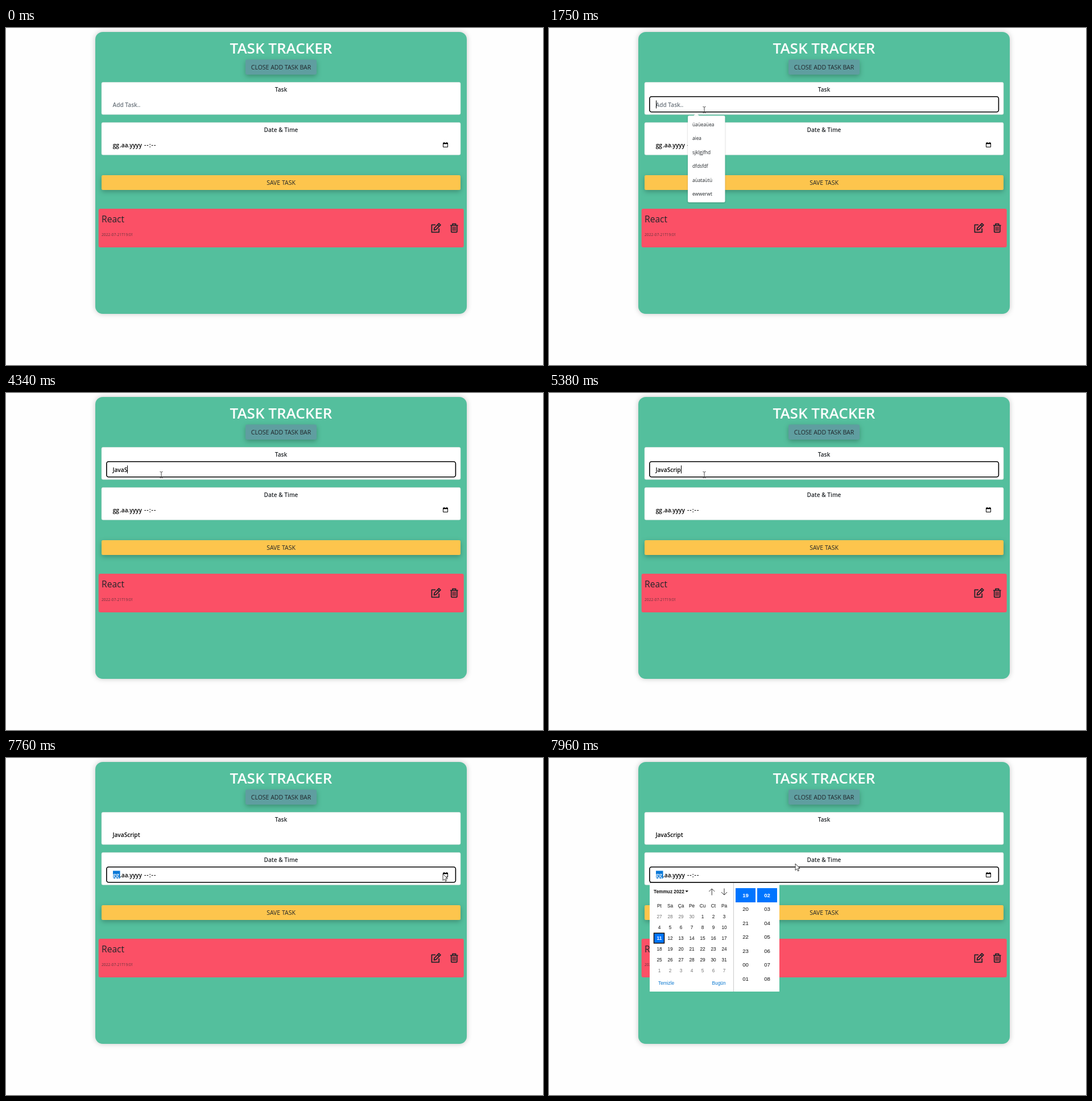
Animation of 944x593 px, one loop 8000 ms. Source, as an HTML page:

```html
<!DOCTYPE html>
<html lang="en">
<head>
<meta charset="utf-8">
<title>Task Tracker</title>
<style>
  html, body { margin: 0; height: 100%; overflow: hidden; background: #fefefe; }
  svg { display: block; width: 100vw; height: 100vh; }
  text { font: 600 10.1px "Open Sans", "Noto Sans", sans-serif; fill: #212529; }
  .mid { text-anchor: middle; }
  .title { font-size: 26px; fill: #fff; }
  .button { font-size: 10.5px; font-weight: 400; }
  .name { font-size: 15.6px; font-weight: 500; }
  .stamp { font-size: 6.75px; font-weight: 300; }
  .field { fill: #000; }
  .hint { fill: #6c757d; }
  .option { font-size: 8.3px; font-weight: 400; }
  .raised { filter: drop-shadow(0 3px 4px rgba(0, 0, 0, .25)); }
  .popup { filter: drop-shadow(0 1px 1px rgba(0, 0, 0, .25)); }
  .focus { fill: none; stroke: #000; stroke-width: 1.6; }
  .icon { fill: none; stroke: #212529; stroke-width: 1.8; stroke-linejoin: round; }
  #calendar text { font: 8.3px "Liberation Sans", Arial, sans-serif; fill: #101010; }
  #calendar .time { font-size: 9.6px; }
  #calendar .other { fill: #757575; }
  #calendar .link { fill: #0a78d0; }
  #calendar .bold { font-weight: 700; }
  #calendar .picked { font-weight: 700; fill: #fff; }
</style>
</head>
<body>
<svg viewBox="0 0 944 593">
  <rect x="157" y="7" width="653" height="496" rx="13" fill="#54bf9d"
        style="filter: drop-shadow(0 0 5px rgba(0,0,0,.22))"/>
  <text class="mid title" x="483.5" y="45">TASK TRACKER</text>

  <rect class="raised" x="421" y="55.5" width="125" height="26.5" rx="3" fill="#5f9ea0"/>
  <text class="mid button" x="483.5" y="73">CLOSE ADD TASK BAR</text>

  <g fill="#fff" stroke="#d5dcd9" stroke-width=".6">
    <rect x="168" y="95.5" width="631" height="56.7" rx="2.5"/>
    <rect x="168" y="166.3" width="631" height="57" rx="2.5"/>
  </g>
  <text class="mid" x="483.5" y="112">Task</text>
  <text class="mid" x="483.5" y="183">Date &amp; Time</text>

  <text id="hint" class="hint" x="187.5" y="138.6">Add Task..</text>
  <text id="typed" class="field" x="187.5" y="138.6"></text>
  <rect id="caret" y="127.5" width="1" height="14"/>
  <rect id="taskFocus" class="focus" x="176.8" y="120.8" width="613.6" height="27" rx="3.5"/>

  <rect id="dayMark" x="188" y="198.5" width="12.5" height="13.5" fill="#0a78d7"/>
  <text id="day" class="field" x="187.7" y="209.6">gg</text>
  <text class="field" x="200" y="209.6">.aa.yyyy</text>
  <text class="field" x="243" y="209.6" letter-spacing="1.1">--:--</text>
  <path d="M768.5 202.5h8v7h-8z" fill="none" stroke="#000"/>
  <path d="M768 202h9v2.2h-9zM769.5 200.7h1.3v2h-1.3zM774.2 200.7h1.3v2h-1.3z"/>
  <rect id="dateFocus" class="focus" x="176.8" y="191.8" width="613.6" height="27" rx="3.5"/>

  <rect class="raised" x="168" y="259" width="631" height="26" rx="2.5" fill="#fdc54d"/>
  <text class="mid button" x="483.5" y="276">SAVE TASK</text>

  <rect x="162.7" y="318" width="642" height="68" rx="3" fill="#fb5066"/>
  <text class="name" x="168" y="342.2">React</text>
  <text class="stamp" x="168" y="366.3">2022-07-21T19:01</text>
  <g class="icon">
    <path d="M755 346.3h-6.6v13h12.8v-6.5"/>
    <path d="M752.5 355.5l.5-3.4 8-8.2 2.8 2.8-8 8.2zM758.7 346.2l2.9 2.9"/>
    <path d="M781 347.4h13.6M785 347v-2.4h5.6v2.4M782.8 348v10.2q0 1.2 1.2 1.2h7.6q1.2 0 1.2-1.2V348"/>
    <path d="M785.6 349.5v7.5M787.8 349.5v7.5M790 349.5v7.5" stroke-width="1.2"/>
  </g>

  <g id="allOptions" class="popup"></g>
  <g id="oneOption" class="popup"></g>
  <g id="calendar"></g>

  <path id="arrow" d="M0 0V11.6L2.7 9.1 4.6 13 6.4 12.2 4.6 8.4H8.2Z" fill="#fff" stroke="#222" stroke-width=".9"/>
  <path id="beam" d="M-2.5-5.5Q0-5.5 0-4.3V4.3Q0 5.5-2.5 5.5M2.5-5.5Q0-5.5 0-4.3M2.5 5.5Q0 5.5 0 4.3"
        fill="none" stroke="#444"/>
</svg>
<script>
const LOOP = 8000, BLINK = 530;
const TASK_FOCUS = 1690, DATE_FOCUS = 7690, CALENDAR_OPEN = 7860;
const WORD = "JavaScript";
const KEY_TIMES = [3030, 3280, 3680, 3810, 4340, 4590, 5050, 5180, 5380, 5980];
// time, x, y of the pointer
const PATH = [
  [120, 903, 579], [880, 509, 328], [1620, 273, 144], [6150, 273, 144],
  [6250, 285, 70], [6310, 300, 4], [6370, 300, -20], [6450, 302, -20],
  [6510, 302, 150], [6580, 298, 188], [6800, 380, 258], [7000, 520, 274],
  [7270, 731, 240], [7480, 797, 208], [7650, 768, 204], [7770, 768, 204], [7960, 433, 186]
];

const el = id => document.getElementById(id);
const clamp = v => Math.max(0, Math.min(1, v));
const show = (id, opacity) => el(id).setAttribute("opacity", Number(opacity));

function add(parent, tag, attrs, content = "") {
  const node = document.createElementNS("http://www.w3.org/2000/svg", tag);
  for (const key in attrs) node.setAttribute(key, attrs[key]);
  node.textContent = content;
  parent.append(node);
}

function buildOptions(id, x, width, words) {
  const group = el(id), height = words.length * 24.5 + 5.5;
  add(group, "path", { d: "M254 154.5l5-5 5 5z", fill: "#fff" });
  add(group, "rect", { x, y: 154.2, width, height, rx: 2.5, fill: "#fff" });
  words.forEach((word, i) => add(group, "text", { class: "option", x: 252, y: 172.6 + 24.5 * i }, word));
}

function buildCalendar() {
  const group = el("calendar");
  const label = (x, y, content, cls = "") => add(group, "text", { x, y, class: cls }, content);
  const box = (x, y, width, height, fill, stroke = "none") =>
    add(group, "rect", { x, y, width, height, fill, stroke, "stroke-width": 1.5 });

  box(177, 219.5, 228, 191.5, "#fff");
  box(177, 219, 228, 1, "#555");
  box(324, 220, 1, 191, "#ccc");
  label(184, 237.5, "Temmuz 2022", "bold");
  add(group, "path", { d: "M239.5 233.2h5.4l-2.7 3z" });
  add(group, "path", {
    d: "M286.3 241.5v-11.5M281.3 235l5-5 5 5M308 229.5v11.5M303 236l5 5 5-5",
    fill: "none", stroke: "#333"
  });

  const column = i => 194 + 19 * i;
  ["Pt", "Sa", "Ça", "Pe", "Cu", "Ct", "Pa"].forEach((d, i) => label(column(i), 262.7, d, "mid"));
  box(184.5, 308.2, 18, 17.6, "#0075ff", "#101010");
  for (let i = 0; i < 42; i++) {
    const date = new Date(2022, 5, 27 + i), inMonth = date.getMonth() === 6;
    const style = !inMonth ? "other" : date.getDate() === 11 ? "picked" : "";
    label(column(i % 7), 282 + 19 * Math.floor(i / 7), date.getDate(), "mid " + style);
  }
  label(192, 398.5, "Temizle", "link");
  label(286.5, 398.5, "Bugün", "link");

  box(328, 229, 35, 25, "#0075ff");
  box(366, 229, 35, 25, "#0075ff");
  for (let i = 0; i < 7; i++) {
    const style = "mid time" + (i ? "" : " picked"), y = 244.8 + 24.5 * i;
    const pad = n => String(n).padStart(2, "0");
    label(345.5, y, pad((19 + i) % 24), style);
    label(383.5, y, pad(2 + i), style);
  }
}

function pointerAt(t) {
  const next = PATH.findIndex(p => p[0] > t);
  if (next < 0) return PATH.at(-1).slice(1);
  const [t0, x0, y0] = PATH[next - 1], [t1, x1, y1] = PATH[next];
  const k = (t - t0) / (t1 - t0);
  return [x0 + (x1 - x0) * k, y0 + (y1 - y0) * k];
}

function drawPointer(t) {
  const visible = t >= PATH[0][0];
  const [x, y] = visible ? pointerAt(t) : [0, 0];
  const overInput = x > 176 && x < 791 && y > 120 && y < 149;
  for (const id of ["arrow", "beam"]) {
    el(id).setAttribute("transform", `translate(${x} ${y})`);
    show(id, visible && overInput === (id === "beam"));
  }
}

function draw(t) {
  const count = KEY_TIMES.filter(k => k <= t).length;
  const inTask = t >= TASK_FOCUS && t < DATE_FOCUS, inDate = t >= DATE_FOCUS;
  const lastKey = count ? KEY_TIMES[count - 1] : TASK_FOCUS;

  el("typed").textContent = WORD.slice(0, count);
  show("hint", !count);
  const width = count ? el("typed").getComputedTextLength() : 0;
  el("caret").setAttribute("x", Math.round(187.5 + width));
  show("caret", inTask && (t - lastKey) % (2 * BLINK) < BLINK);

  show("taskFocus", inTask);
  show("dateFocus", inDate);
  show("dayMark", inDate);
  el("day").style.fill = inDate ? "#fff" : "#000";

  show("allOptions", t < KEY_TIMES[0] ? clamp((t - TASK_FOCUS + 30) / 90) : 0);
  show("oneOption", t >= KEY_TIMES[0] ? clamp(1 - (t - KEY_TIMES[1]) / 150) : 0);
  show("calendar", t >= CALENDAR_OPEN);
  drawPointer(t);
}

buildOptions("allOptions", 244, 65.5, ["üaüeaüea", "aiea", "sjklgjfhd", "dfdsfdf", "aüataütü", "ewwerwt"]);
buildOptions("oneOption", 245, 47.5, ["jhgjg"]);
buildCalendar();

const start = performance.now();
function tick() {
  draw((performance.now() - start) % LOOP);
  requestAnimationFrame(tick);
}
tick();
</script>
</body>
</html>
```
